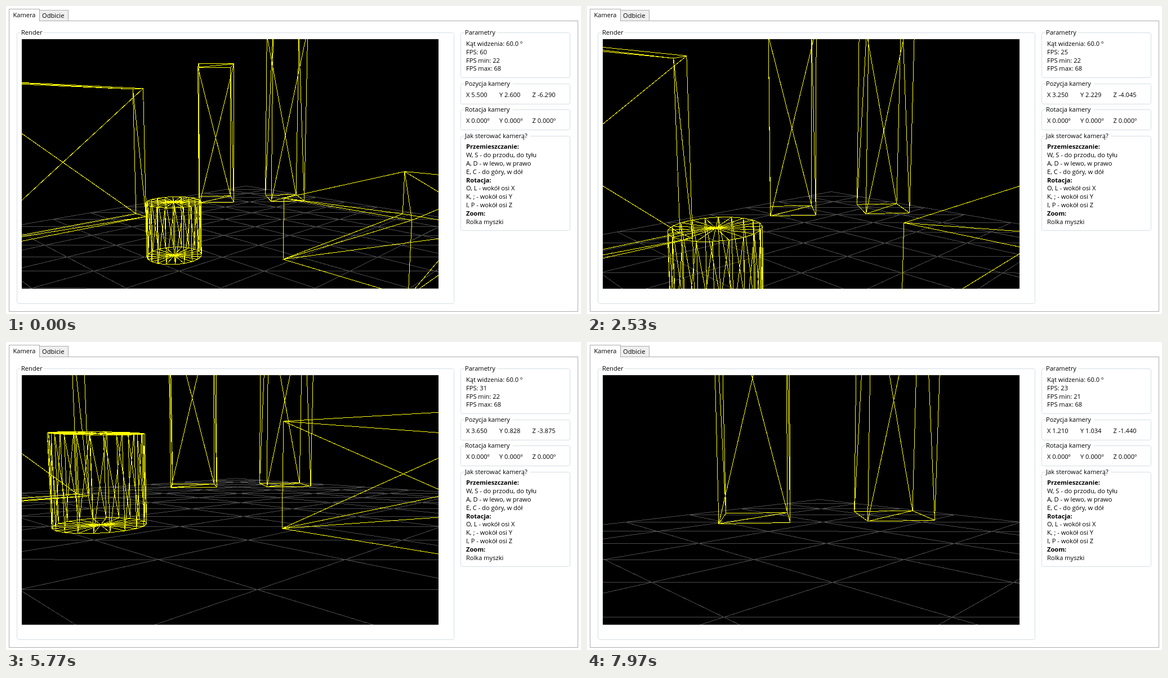
These frames come from a looping animation (1021 px wide and 548 px high, 8 s). An HTML page:

```html
<!DOCTYPE html>
<html lang="pl">
<head>
<meta charset="utf-8">
<title>Kamera</title>
<style>
  html, body { margin: 0; width: 100%; height: 100%; overflow: hidden; background: #fff; }
  #stage { display: block; width: 1021px; height: 548px; }
  text { font: 11.1px "Open Sans", "Noto Sans", sans-serif; fill: #000; }
  .bold { font-weight: 700; }
  .wire { fill: none; stroke-width: 1; shape-rendering: crispEdges; }
</style>
</head>
<body>
<svg id="stage" viewBox="0 0 1021 548" xmlns="http://www.w3.org/2000/svg">
  <rect width="1021" height="548" fill="#fff"/>
  <g stroke="#acacac" fill="#fff" shape-rendering="crispEdges">
    <rect x="5.5" y="26.5" width="1010" height="517"/>
    <rect x="59.5" y="7.5" width="51" height="19" fill="#efefef"/>
    <path d="M5.5 27V5.5H59.5V27"/>
    <path d="M6 26.5H59" stroke="#fff"/>
  </g>
  <g id="ui"></g>
  <svg x="28" y="59" width="740" height="444" viewBox="28 59 740 444" overflow="hidden">
    <rect x="28" y="59" width="740" height="444" fill="#000"/>
    <path id="floor" class="wire" stroke="#4a4a4a"/>
    <path id="solids" class="wire" stroke="#ff0"/>
  </svg>
</svg>
<script>
const LOOP = 8000;
const NS = "http://www.w3.org/2000/svg";
const ui = document.getElementById("ui");

function add(tag, attrs, content = "") {
  const node = document.createElementNS(NS, tag);
  for (const key in attrs) node.setAttribute(key, attrs[key]);
  node.textContent = content;
  return ui.appendChild(node);
}
const label = (x, y, content, bold) => add("text", { x, y, class: bold ? "bold" : "" }, content);

function group(x, y, width, height, title, titleWidth) {
  add("rect", { x, y, width, height, rx: 3, fill: "none", stroke: "#d5dfe5" });
  add("rect", { x: x + 5, y: y - 2, width: titleWidth + 5, height: 4, fill: "#fff" });
  label(x + 7.5, y + 3.5, title);
}

// ---- interface ----
label(12.5, 20, "Kamera");
label(64, 20.5, "Odbicie");
group(19.5, 47.5, 776, 482, "Render", 37);
group(807.5, 47.5, 194, 80, "Parametry", 54);
group(807.5, 138.5, 194, 36, "Pozycja kamery", 82);
group(807.5, 184.5, 194, 36, "Rotacja kamery", 82);
group(807.5, 231.5, 194, 168, "Jak sterować kamerą?", 113);

label(817, 71, "Kąt widzenia: 60.0 º");
const fpsText = label(817, 86, "");
const minText = label(817, 101, "");
label(817, 115, "FPS max: 68");
const columns = [["X", 817], ["Y", 876], ["Z", 934.5]];
const positionTexts = columns.map(([, x]) => label(x, 161.5, ""));
columns.forEach(([axis, x]) => label(x, 207.5, axis + " 0.000º"));
["Przemieszczanie:", "W, S - do przodu, do tyłu", "A, D - w lewo, w prawo",
 "E, C - do góry, w dół", "Rotacja:", "O, L - wokół osi X", "K, ; - wokół osi Y",
 "I, P - wokół osi Z", "Zoom:", "Rolka myszki"
].forEach((line, i) => label(817, 254.3 + i * 14.83, line, line.endsWith(":")));

// ---- scene: lists of 3D segments ----
function floorGrid(half) {
  const lines = [];
  for (let i = -half; i <= half; i++) {
    lines.push([[i, 0, -half], [i, 0, half]], [[-half, 0, i], [half, 0, i]]);
  }
  for (let d = 1 - 2 * half; d < 2 * half; d++) {
    const lo = Math.max(-half, d - half), hi = Math.min(half, d + half);
    lines.push([[lo, 0, lo - d], [hi, 0, hi - d]]);
  }
  return lines;
}

// Triangulated walls over a ring of [x, z] points.
function walls(ring, height) {
  const low = ring.map(([x, z]) => [x, 0, z]);
  const high = ring.map(([x, z]) => [x, height, z]);
  const lines = ring.flatMap((_, i) => {
    const next = (i + 1) % ring.length;
    return [[low[i], low[next]], [high[i], high[next]], [low[i], high[i]], [low[i], high[next]]];
  });
  return { low, high, lines };
}

function box(cx, cz, width, height, depth, degrees = 0) {
  const c = Math.cos(degrees * Math.PI / 180), s = Math.sin(degrees * Math.PI / 180);
  const ring = [[-1, -1], [1, -1], [1, 1], [-1, 1]].map(([i, j]) => {
    const u = i * width / 2, v = j * depth / 2;
    return [cx + u * c - v * s, cz + u * s + v * c];
  });
  const { low, high, lines } = walls(ring, height);
  return [...lines, [low[0], low[2]], [high[1], high[3]]];
}

function cylinder(cx, cz, radius, height, sides) {
  const ring = Array.from({ length: sides }, (_, i) => {
    const a = i * 2 * Math.PI / sides;
    return [cx + radius * Math.cos(a), cz + radius * Math.sin(a)];
  });
  const { low, high, lines } = walls(ring, height);
  return [...lines, ...low.map(p => [[cx, 0, cz], p]), ...high.map(p => [[cx, height, cz], p])];
}

const grid = floorGrid(5);
const solids = [
  ...box(-4, 2.57, 1, 4, 1, 50.5),
  ...box(-2.66, 4.215, 1, 5, 1, 50.5),
  ...box(-3.845, -2.22, 0.46, 3.21, 4.03),
  ...box(1.98, 2.185, 2.25, 1.115, 5),
  ...cylinder(-0.7, -1.555, 0.5, 1, 20)
];

// ---- camera ----
const FOCAL = 444 / Math.tan(Math.PI / 6);
const NEAR = 0.1;
const FORWARD = [-0.70313, -0.11594, 0.70156];
const RIGHT = [0.70631, 0, 0.70789];
const UP = [-0.08207, 0.99326, 0.08189];
const dot = (a, b) => a[0] * b[0] + a[1] * b[1] + a[2] * b[2];

function toView(point, eye) {
  const d = point.map((value, i) => value - eye[i]);
  return [dot(d, RIGHT), dot(d, UP), dot(d, FORWARD)];
}
const toScreen = ([x, y, z]) =>
  (398 + FOCAL * x / z).toFixed(1) + " " + (281 - FOCAL * y / z).toFixed(1);

function wirePath(lines, eye) {
  let path = "";
  for (const [start, end] of lines) {
    let a = toView(start, eye), b = toView(end, eye);
    if (a[2] > b[2]) [a, b] = [b, a];
    if (b[2] <= NEAR) continue;
    if (a[2] < NEAR) {
      const k = (NEAR - a[2]) / (b[2] - a[2]);
      a = a.map((value, i) => value + k * (b[i] - value));
    }
    path += "M" + toScreen(a) + "L" + toScreen(b);
  }
  return path;
}

// ---- timeline: key presses spread evenly over each span, "." only refreshes FPS ----
const STEPS = {
  f: [-0.140625, -0.02319, 0.14031],
  b: [0.140625, 0.02319, -0.14031],
  r: [0.1422, 0, 0.1425],
  u: [-0.0165, 0.2001, 0.0164],
  d: [0.0165, -0.2001, -0.0164],
  ".": [0, 0, 0]
};
const SPANS = [
  [130, 870, "......f......"], [970, 1030, ".."],
  [1300, 1670, "fffff"], [1770, 2100, "fffff"], [2200, 2530, "fffff"],
  [2600, 2730, "fb"], [3000, 3300, "bb.r"], [3570, 3670, "r.."], [3930, 3930, "."],
  [4070, 4630, "..........d"], [4870, 5530, "dddddd.f"], [5770, 5770, "f"],
  [5830, 6470, "ffffffff"], [6570, 6570, "f"], [6630, 7230, ".ffffffu"],
  [7370, 7370, "u"], [7530, 7630, "uf"], [7770, 7770, "f"], [7970, 7970, "."]
];
const FPS = [[0, 60], [1670, 34], [2530, 25], [4630, 32], [5770, 31], [6470, 27], [7970, 23]];

function fpsAt(time) {
  const i = Math.max(1, FPS.findIndex(([t]) => t >= time));
  const [t0, v0] = FPS[i - 1], [t1, v1] = FPS[i];
  return Math.round(v0 + (v1 - v0) * (time - t0) / (t1 - t0));
}

const states = [{ time: 0, eye: [5.5, 2.6, -6.29], fps: 60 }];
for (const [from, to, keys] of SPANS) {
  [...keys].forEach((key, i) => {
    const time = Math.round(from + (to - from) * i / Math.max(1, keys.length - 1));
    const { eye } = states[states.length - 1];
    states.push({ time, eye: eye.map((v, axis) => v + STEPS[key][axis]), fps: fpsAt(time) });
  });
}

const floorPath = document.getElementById("floor");
const solidsPath = document.getElementById("solids");
let shown = null;

function render(time) {
  let state = states[0];
  for (const candidate of states) if (candidate.time <= time) state = candidate;
  if (state === shown) return;
  shown = state;
  floorPath.setAttribute("d", wirePath(grid, state.eye));
  solidsPath.setAttribute("d", wirePath(solids, state.eye));
  fpsText.textContent = "FPS: " + state.fps;
  minText.textContent = "FPS min: " + (state.time < 7200 ? 22 : 21);
  positionTexts.forEach((node, i) => {
    node.textContent = columns[i][0] + " " + state.eye[i].toFixed(3);
  });
}

const began = performance.now();
function tick() {
  render((performance.now() - began) % LOOP);
  requestAnimationFrame(tick);
}
render(0);
requestAnimationFrame(tick);
</script>
</body>
</html>
```
